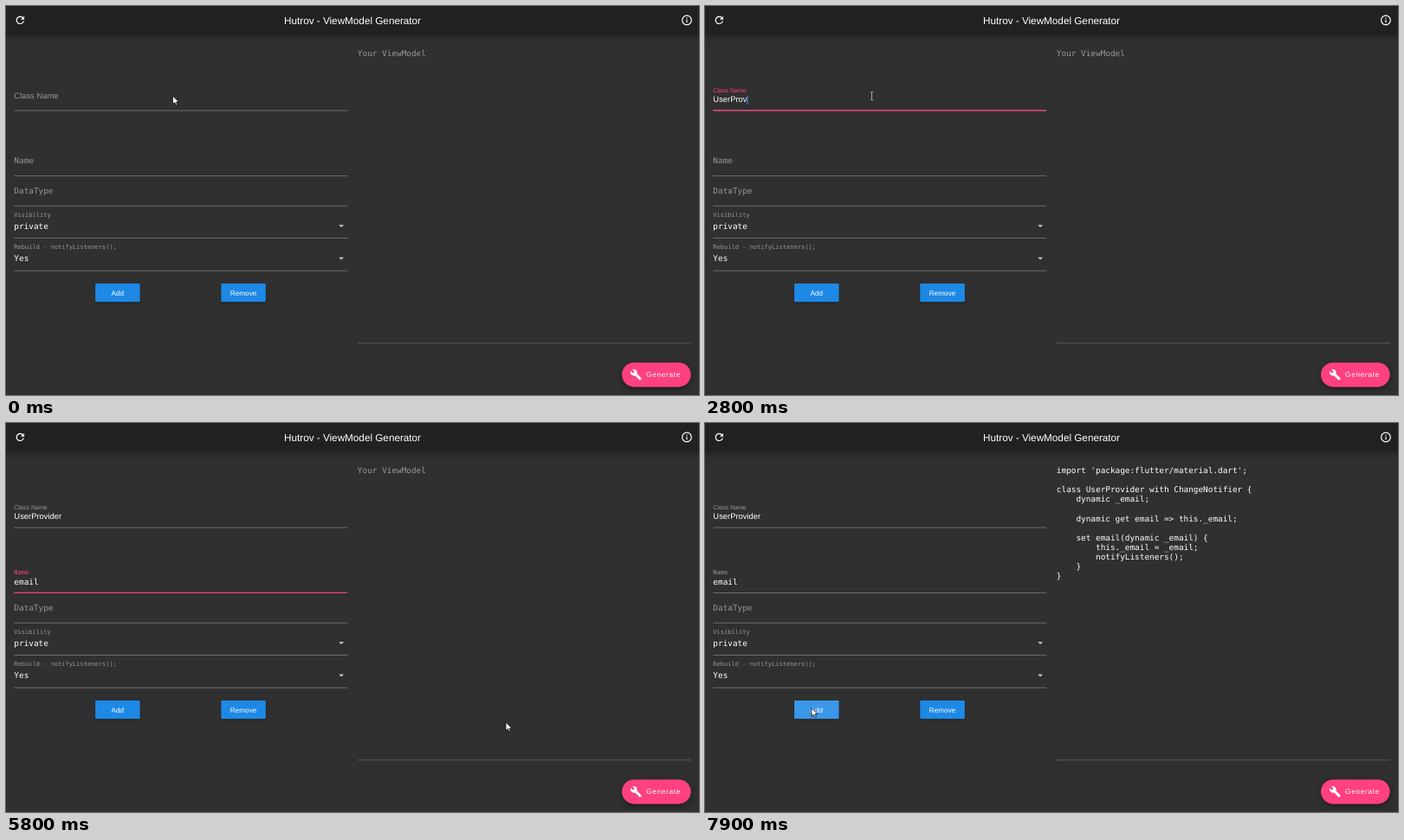
These frames come from a looping animation (800 px wide and 450 px high, 8 s). An HTML page:

```html
<!DOCTYPE html>
<html lang="en">
<head>
<meta charset="utf-8">
<title>ViewModel Generator</title>
<style>
  html, body { margin: 0; width: 100%; height: 100%; overflow: hidden; background: #303030; }
  svg { display: block; width: 100vw; height: 100vh; }
  text { font: 16px "Liberation Sans", Arial, sans-serif; fill: #fff; white-space: pre; text-rendering: geometricPrecision; }
  .mono { font-family: "DejaVu Sans Mono", monospace; }
  .hint { fill: #979797; }
  .small { font-size: 12px; }
  .middle { text-anchor: middle; }
  .title { font-size: 20px; }
  .label { font-size: 14px; }
  .line { fill: #979797; }
  .accent { fill: #ff4081; }
  .caret { fill: #4285f4; }
  .bar { fill: #212121; filter: drop-shadow(0 3px 5px rgba(0, 0, 0, .4)); }
  .button { fill: #1e88e5; filter: drop-shadow(0 2px 2px rgba(0, 0, 0, .4)); }
  .fab { fill: #ff4081; filter: drop-shadow(0 4px 6px rgba(0, 0, 0, .4)); }
  .icon { fill: #fff; }
</style>
</head>
<body>
<svg id="stage" viewBox="0 0 1366 768" preserveAspectRatio="none"></svg>
<script>
const DURATION = 8000, TICK = 100, UNIT = 1366 / 800;
const stage = document.getElementById('stage');

function add(tag, attrs, text = '', parent = stage) {
  const node = document.createElementNS('http://www.w3.org/2000/svg', tag);
  for (const key in attrs) node.setAttribute(key, attrs[key]);
  node.textContent = text;
  parent.append(node);
  return node;
}
const rect = (x, y, width, height, cls, rx = 0) => add('rect', { x, y, width, height, rx, class: cls });
const write = (x, y, text, cls = '') => add('text', { x, y, class: cls }, text);
const icon = (x, y, d) => add('path', { d, class: 'icon', transform: `translate(${x} ${y})` });
const clamp = v => Math.max(0, Math.min(1, v));
const ease = v => v * v * (3 - 2 * v);

// app bar
rect(-30, -30, 1426, 86, 'bar');
write(683, 35, 'Hutrov - ViewModel Generator', 'title middle');
icon(16, 16, 'M17.65 6.35C16.2 4.9 14.21 4 12 4c-4.42 0-7.99 3.58-7.99 8s3.57 8 7.99 8c3.73 0 6.84-2.55 7.73-6h-2.08c-.82 2.33-3.04 4-5.65 4-3.31 0-6-2.69-6-6s2.69-6 6-6c1.66 0 3.14.69 4.22 1.78L13 11h7V4l-2.35 2.35z');
icon(1330, 16, 'M11 7h2v2h-2zm0 4h2v6h-2zm1-9C6.48 2 2 6.48 2 12s4.48 10 10 10 10-4.48 10-10S17.52 2 12 2zm0 18c-4.41 0-8-3.59-8-8s3.59-8 8-8 8 3.59 8 8-3.59 8-8 8z');

// text fields: `base` is the underline position
function makeField(base, name, cls, labelRise) {
  rect(16, base, 657, 1, 'line');
  return {
    base, labelRise,
    accent: rect(16, base - 1, 657, 2, 'accent'),
    hint: write(16, base - 16, name, cls + ' hint'),
    value: write(16, base - 16, '', cls),
    label: write(16, base - 24, name, cls),
    caret: rect(16, base - 29, 2, 17, 'caret')
  };
}
const classField = makeField(206, 'Class Name', '', 35);
const nameField = makeField(335, 'Name', 'mono', 36);
write(16, 370, 'DataType', 'mono hint');
rect(16, 394, 657, 1, 'line');

function makeDropdown(base, label, value) {
  write(16, base - 42, label, 'mono small hint');
  write(16, base - 18, value, 'mono');
  icon(649, base - 36, 'M7 10l5 5 5-5z').style.fill = '#d0d0d0';
  rect(16, base, 657, 1, 'line');
}
makeDropdown(458, 'Visibility', 'private');
makeDropdown(522, 'Rebuild - notifyListeners();', 'Yes');

const overlay = (x, y, w, h, rx) => {
  const node = rect(x, y, w, h, '', rx);
  node.style.fill = '#fff';
  return node;
};
rect(176, 548, 88, 36, 'button', 2);
const addHover = overlay(176, 548, 88, 36, 2);
write(220, 571, 'Add', 'label middle');
rect(424, 548, 88, 36, 'button', 2);
write(468, 571, 'Remove', 'label middle');

// generated code
const codeHint = write(693, 99, 'Your ViewModel', 'mono hint');
const code = add('g');
`import 'package:flutter/material.dart';

class UserProvider with ChangeNotifier {
    dynamic _email;

    dynamic get email => this._email;

    set email(dynamic _email) {
        this._email = _email;
        notifyListeners();
    }
}`.split('\n').forEach((line, i) =>
  add('text', { x: 693, y: 99 + 19 * i, class: 'mono' }, line, code));
rect(693, 665, 657, 1, 'line').style.opacity = .76;

// floating button
rect(1214, 704, 136, 48, 'fab', 24);
const fabHover = overlay(1214, 704, 136, 48, 24);
icon(1230, 716, 'M22.7 19l-9.1-9.1c.9-2.3.4-5-1.5-6.9-2-2-5-2.4-7.4-1.3L9 6 6 9 1.6 4.7C.4 7.1.9 10.1 2.9 12.1c1.9 1.9 4.6 2.4 6.9 1.5l9.1 9.1c.4.4 1 .4 1.4 0l2.3-2.3c.5-.4.5-1.1.1-1.4z');
write(1262, 733, 'Generate', 'label').style.letterSpacing = '1.25px';

// mouse pointer
const pointer = add('g');
const arrow = add('path', {
  d: 'M0 0V9.6L2.3 7.5 3.8 10.9 5.4 10.2 3.9 7H7Z',
  fill: '#fff', stroke: '#111', 'stroke-width': .8
}, '', pointer);
const beam = add('path', {
  d: 'M-1.6 -4.5H-.5L0 -4 .5 -4.5H1.6M0 -4V4M-1.6 4.5H-.5L0 4 .5 4.5H1.6',
  fill: 'none', stroke: '#c8c8c8', 'stroke-width': .8
}, '', pointer);

// [time, value] tables
const classText = [[1400, 'U'], [1600, 'Us'], [1800, 'Use'], [1900, 'User'],
  [2500, 'UserP'], [2600, 'UserPr'], [2700, 'UserPro'], [2800, 'UserProv'],
  [3000, 'UserProvi'], [3100, 'UserProvid'], [3200, 'UserProvide'], [3300, 'UserProvider']];
const nameText = [[4500, 'e'], [4700, 'em'], [4800, 'ema'], [5000, 'emai'], [5100, 'email']];
const classCaret = [[0, 0], [100, 1], [500, .5], [600, 0], [1100, .7], [1200, 1], [2300, 0], [2500, 1], [3600, 0]];
const nameCaret = [[0, 0], [4200, 1], [5600, 0], [6100, 1], [6600, 0]];
const path = [[0, 192.5, 104], [3500, 192.5, 104], [3600, 193, 120], [3700, 194, 150],
  [3800, 194.5, 175], [3900, 195, 185.5], [5500, 195, 185.5], [5600, 290, 235], [5700, 460, 305],
  [5800, 577, 346], [5900, 577, 346], [6000, 640, 385], [6100, 700, 415], [6300, 733, 431],
  [6800, 733, 431], [6900, 700, 424], [7000, 610, 406], [7100, 480, 386], [7200, 346, 370],
  [7300, 210, 358], [7400, 90, 348], [7500, 23, 340], [7600, 65, 333], [7700, 123, 329.5]];

const latest = (table, t, fallback) => table.reduce((v, [at, next]) => t >= at ? next : v, fallback);

function position(t) {
  const i = path.findIndex(p => p[0] > t);
  if (i < 0) return path.at(-1).slice(1);
  const [a, b] = [path[i - 1], path[i]], k = (t - a[0]) / (b[0] - a[0]);
  return [1, 2].map(n => a[n] + (b[n] - a[n]) * k);
}

function drawField(field, t, focusAt, blurAt, text, caret) {
  const float = ease(clamp((t - focusAt + 50) / 200));
  const focus = float * (1 - clamp((t - blurAt + 50) / 200));
  const value = latest(text, t, '');
  field.accent.style.opacity = focus;
  field.hint.style.opacity = value ? 0 : float;
  if (field.value.textContent !== value) field.value.textContent = value;
  field.label.style.fontSize = 16 - 4 * float + 'px';
  field.label.style.fill = `color-mix(in srgb, #ff4081 ${focus * 100}%, #979797)`;
  field.label.setAttribute('y', field.base - 24 - (field.labelRise - 24) * float);
  field.caret.setAttribute('x', 16 + (value ? field.value.getComputedTextLength() : 0));
  field.caret.style.opacity = latest(caret, t, 0);
}

function render(now) {
  const t = Math.floor(now % DURATION / TICK) * TICK;
  drawField(classField, t, 100, 4200, classText, classCaret);
  drawField(nameField, t, 4200, 6700, nameText, nameCaret);

  code.style.opacity = t >= 6700 ? 1 : 0;
  codeHint.style.opacity = t >= 6700 ? 0 : 1;
  fabHover.style.opacity = .05 * clamp((t - 6100) / 200) * (1 - clamp((t - 6700) / 200));
  addHover.style.opacity = .13 * clamp((t - 7700) / 200);

  const [x, y] = position(t);
  const overText = (t >= 100 && t < 3600) || (t >= 3900 && t < 5600);
  pointer.setAttribute('transform', `scale(${UNIT}) translate(${x} ${y})`);
  arrow.style.opacity = overText ? 0 : 1;
  beam.style.opacity = overText ? 1 : 0;
}

const start = performance.now();
function loop() {
  render(performance.now() - start);
  requestAnimationFrame(loop);
}
loop();
</script>
</body>
</html>
```
